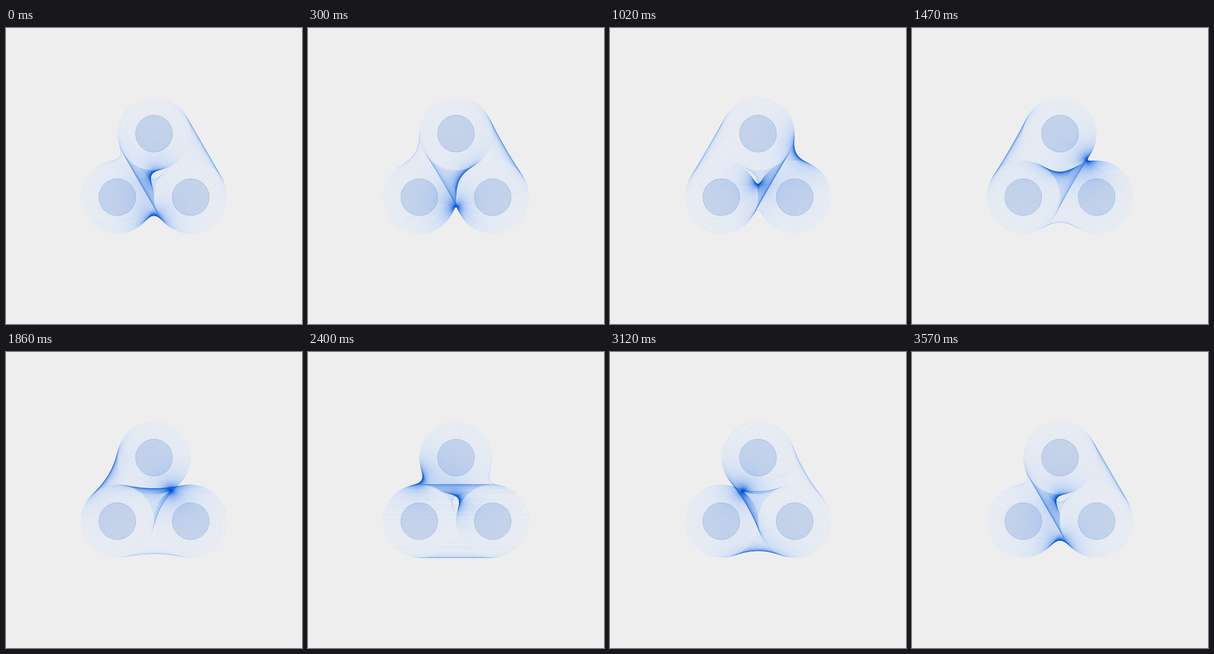
These frames come from a looping animation (500 by 500 pixels, 3.6 s). An HTML page with a canvas:

```html
<!DOCTYPE html>
<html lang="en">
<head>
<meta charset="utf-8">
<title>Three twisted circles</title>
<style>
  html, body { margin: 0; width: 100%; height: 100%; overflow: hidden; background: #eee; }
  canvas { position: absolute; left: 0; top: 0; width: 500px; height: 500px; }
  svg { position: absolute; width: 0; height: 0; }
  #ink { filter: url(#tone); }
</style>
</head>
<body>
<!-- Thin ink fades out, layered ink stays strong. -->
<svg><filter id="tone" x="0" y="0" width="1" height="1" color-interpolation-filters="sRGB">
  <feComponentTransfer><feFuncA type="gamma" amplitude="1" exponent="1.5" offset="0"/></feComponentTransfer>
</filter></svg>
<canvas id="paper" width="500" height="500"></canvas>
<canvas id="ink" width="500" height="500"></canvas>
<script>
  const [paper, ink] = ['paper', 'ink'].map(id => document.getElementById(id).getContext('2d'));
  const LOOP = 3600, STEP = 30, LINES = 120;
  const RADIUS = 62, CORE = 31.2;
  const TAU = Math.PI * 2;

  // Touching circles in a triangle: right, top, left.
  const spread = 2 * RADIUS / Math.sqrt(3);
  const polar = (x, y, r, a) => [x + r * Math.cos(a), y - r * Math.sin(a)];
  const centers = [-1, 3, 7].map(k => polar(250, 250, spread, k * Math.PI / 6));

  // Straight lines between two circles, the far ends turned by a twist.
  function strands(ctx, from, to, twist) {
    for (let i = 0; i < LINES; i++) {
      const a = i / LINES * TAU;
      ctx.beginPath();
      ctx.moveTo(...polar(...from, RADIUS, a));
      ctx.lineTo(...polar(...to, RADIUS, a + twist));
      ctx.stroke();
    }
  }

  function web(ctx, turn, color, width) {
    ctx.strokeStyle = color;
    ctx.lineWidth = width;
    centers.forEach((c, k) => strands(ctx, c, centers[(k + 1) % 3], (turn - k / 3) * TAU));
  }

  function cores() {
    paper.fillStyle = 'rgba(20, 85, 185, 0.16)';
    paper.strokeStyle = 'rgba(20, 85, 185, 0.2)';
    paper.lineWidth = 1;
    for (const [x, y] of centers) {
      paper.beginPath();
      paper.arc(x, y, CORE, 0, TAU);
      paper.fill();
      paper.stroke();
    }
  }

  function draw(ms) {
    const turn = Math.floor(ms % LOOP / STEP) * STEP / LOOP;
    for (const ctx of [paper, ink]) ctx.clearRect(0, 0, 500, 500);
    web(paper, turn, 'rgba(255, 255, 255, 0.35)', 1.6);
    cores();
    web(ink, turn, 'rgba(0, 88, 215, 0.18)', 1.1);
  }

  let start;
  function tick(now) {
    start ??= now;
    draw(now - start);
    requestAnimationFrame(tick);
  }
  draw(0);
  requestAnimationFrame(tick);
</script>
</body>
</html>
```
